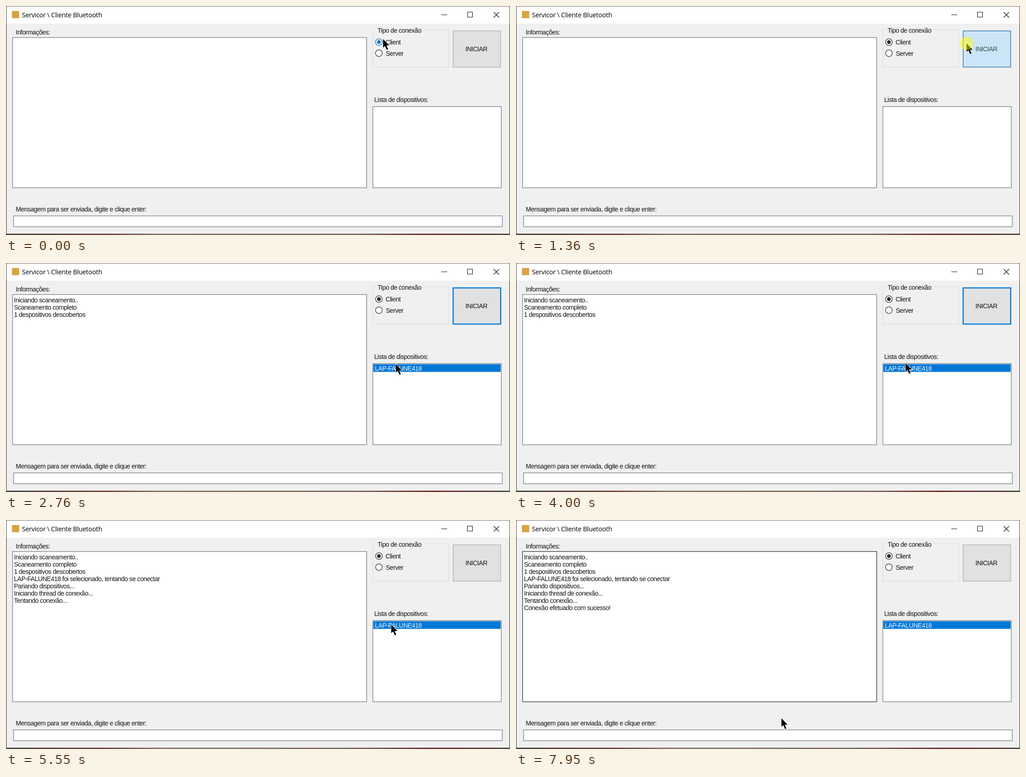
Recreate the animation shown at these times as an HTML page. Size 1108 px wide and 506 px high, loop 8 s.

```html
<!DOCTYPE html>
<html lang="pt">
<head>
<meta charset="utf-8">
<title>Cliente Bluetooth</title>
<style>
  html, body { margin: 0; width: 100%; height: 100%; overflow: hidden; background: #f0f0f0; }
  svg { display: block; width: 1108px; height: 506px; }
  text { font: 14px "Liberation Sans", Arial, sans-serif; letter-spacing: -.47px; fill: #111; white-space: pre; }
  .title { font: 14.5px "Open Sans", "Noto Sans", sans-serif; letter-spacing: -.3px; fill: #000; }
  .field { fill: #fff; stroke: #828488; stroke-width: 1.4; }
  .thin { fill: none; stroke: #111; stroke-width: 1.1; }
  .ring { fill: #fff; stroke: #333; stroke-width: 1.3; }
  #dot { fill: #2b2b2b; }
  .hot #ring { stroke: #1d6fb0; }
  .hot #dot { fill: #1a78c8; }
  #info.hot { stroke: #3c3c3c; }
  #button rect { fill: #e1e1e1; stroke: #adadad; stroke-width: 1.3; }
  #button.focus rect { stroke: #0078d7; stroke-width: 2.5; }
  #button.hover rect { fill: #e5f1fb; stroke: #0078d7; }
  #button.press rect { fill: #cce4f7; stroke: #1f6cab; }
  #button.press text { fill: #2c4b45; }
</style>
</head>
<body>
<svg viewBox="0 0 1108 506">
  <defs>
    <linearGradient id="desk">
      <stop offset="0" stop-color="#4b4644"/>
      <stop offset=".2" stop-color="#7a4a44"/>
      <stop offset=".3" stop-color="#8a7a68"/>
      <stop offset=".7" stop-color="#82706a"/>
      <stop offset=".84" stop-color="#7a3038"/>
      <stop offset="1" stop-color="#55504e"/>
    </linearGradient>
  </defs>

  <!-- window -->
  <rect width="1108" height="506" fill="#6a6866"/>
  <rect y="503" width="1108" height="3" fill="url(#desk)"/>
  <rect x="1.5" y="1" width="1105" height="502" fill="#f0f0f0"/>
  <rect x="1.5" y="1" width="1105" height="38" fill="#fff"/>
  <rect x="13" y="11" width="16" height="16" fill="#d9a441"/>
  <text class="title" x="35" y="25">Servicor \ Cliente Bluetooth</text>
  <path class="thin" d="M957 19.5h13M1014.5 13.5h11v11h-11zM1072 13.5l12 12M1084 13.5l-12 12"/>

  <!-- fields -->
  <text x="21.5" y="63">Informações:</text>
  <rect id="info" class="field" x="14.5" y="69.6" width="778.3" height="332"/>
  <g id="log"></g>
  <text x="809.5" y="212">Lista de dispositivos:</text>
  <rect class="field" x="806.5" y="222.3" width="282.3" height="179.3"/>
  <g id="device">
    <rect x="807.5" y="223.6" width="280" height="17" fill="#0078d7"/>
    <text x="811" y="237.5" style="fill:#eef4fa"></text>
  </g>
  <text x="21.5" y="454">Mensagem para ser enviada, digite e clique enter:</text>
  <rect class="field" x="16.6" y="463.7" width="1074.5" height="24"/>

  <!-- connection type -->
  <path d="M813 52.5H806.5V135H973.5V52.5H918" fill="none" stroke="#dcdcdc" stroke-width="1.2"/>
  <text x="817" y="58.5">Tipo de conexão</text>
  <g id="client">
    <circle id="ring" class="ring" cx="819.8" cy="79.8" r="7.4"/>
    <circle id="dot" cx="819.8" cy="79.8" r="4.2"/>
    <text x="834.5" y="85">Client</text>
  </g>
  <circle class="ring" cx="819.8" cy="104.3" r="7.4"/>
  <text x="835" y="109.7">Server</text>

  <g id="button">
    <rect x="983" y="55" width="104.5" height="80"/>
    <text x="1010" y="99.7">INICIAR</text>
  </g>

  <g id="pointer">
    <path d="M0 0V19L4.2 15.3L7.8 23.8L11 22.4L7.4 14.2H13.4Z" stroke="#fff" stroke-width="1.6" paint-order="stroke"/>
    <circle id="click" r="14.8" fill="#ff0" fill-opacity=".5"/>
  </g>
</svg>
<script>
const LOOP = 8000;
const DEVICE = "LAP-FALUNE418";
const PRESS = 1360, SCAN = 1510, FOUND = 2760, CHOOSE = 5230, PAIR = 5470, LINKED = 6790;
const $ = id => document.getElementById(id);

const home = [829, 73];
// from ms, to ms, redraws, end x, end y
const moves = [
  [660, 1050, 6, 990.5, 82.5],
  [1840, 2070, 4, 948, 110],
  [FOUND, FOUND, 1, 857, 223],
  [3770, 3860, 2, 856.5, 221],
  [4690, 4930, 4, 848.5, 229],
  [CHOOSE, CHOOSE, 1, 847, 231],
  [7490, 7950, 7, 583.5, 438]
];

const log = [
  [SCAN, "Iniciando scaneamento.."],
  [FOUND, "Scaneamento completo", "1 despositivos descobertos"],
  [PAIR, DEVICE + " foi selecionado, tentando se conectar", "Pariando dispositivos...",
    "Iniciando thread de conexão...", "Tentando conexão..."],
  [LINKED, "Conexão efetuado com sucesso!"]
];

const show = (el, on) => el.setAttribute("visibility", on ? "visible" : "hidden");
const within = (t, from, length) => t >= from && t < from + length;
const inside = ([x, y], left, top, right, bottom) => x > left && x < right && y > top && y < bottom;
const ease = p => p * p * p * (10 + p * (6 * p - 15));

// The screen is redrawn a few times per move, so the pointer advances in eased jumps.
function pointerAt(t) {
  let [x, y] = home;
  for (const [from, to, count, endX, endY] of moves) {
    if (t < from) break;
    const step = 1 + Math.floor((t - from) * (count - 1) / (to - from || 1));
    const p = ease(Math.min(1, step / count));
    x += (endX - x) * p;
    y += (endY - y) * p;
  }
  return [x, y];
}

function buttonState(t, spot) {
  if (within(t, PRESS, SCAN - PRESS)) return "press";
  if (inside(spot, 982, 54, 1088, 135)) return "hover";
  return t >= SCAN && t < CHOOSE ? "focus" : "";
}

$("device").querySelector("text").textContent = DEVICE;
const lines = [];
for (const [from, ...texts] of log) for (const words of texts) {
  const el = document.createElementNS("http://www.w3.org/2000/svg", "text");
  el.setAttribute("x", 17.5);
  el.setAttribute("y", 86.5 + 16 * lines.length);
  el.textContent = words;
  $("log").append(el);
  lines.push({ from, el });
}

function draw(t) {
  const spot = pointerAt(t);
  $("pointer").setAttribute("transform", `translate(${spot})`);
  show($("click"), within(t, 190, 170) || within(t, PRESS, 150) ||
    within(t, CHOOSE, 80) || within(t, CHOOSE + 160, 160));

  $("button").setAttribute("class", buttonState(t, spot));
  $("client").classList.toggle("hot", inside(spot, 810, 70, 870, 92));
  // the box keeps its highlight briefly after the pointer leaves
  $("info").classList.toggle("hot", inside(pointerAt(t - 230), 14, 69, 793, 402) ||
    inside(spot, 14, 69, 793, 402));

  for (const { from, el } of lines) show(el, t >= from);
  show($("device"), t >= FOUND);
}

const begin = performance.now();
function tick() {
  draw((performance.now() - begin) % LOOP);
  requestAnimationFrame(tick);
}
tick();
</script>
</body>
</html>
```
